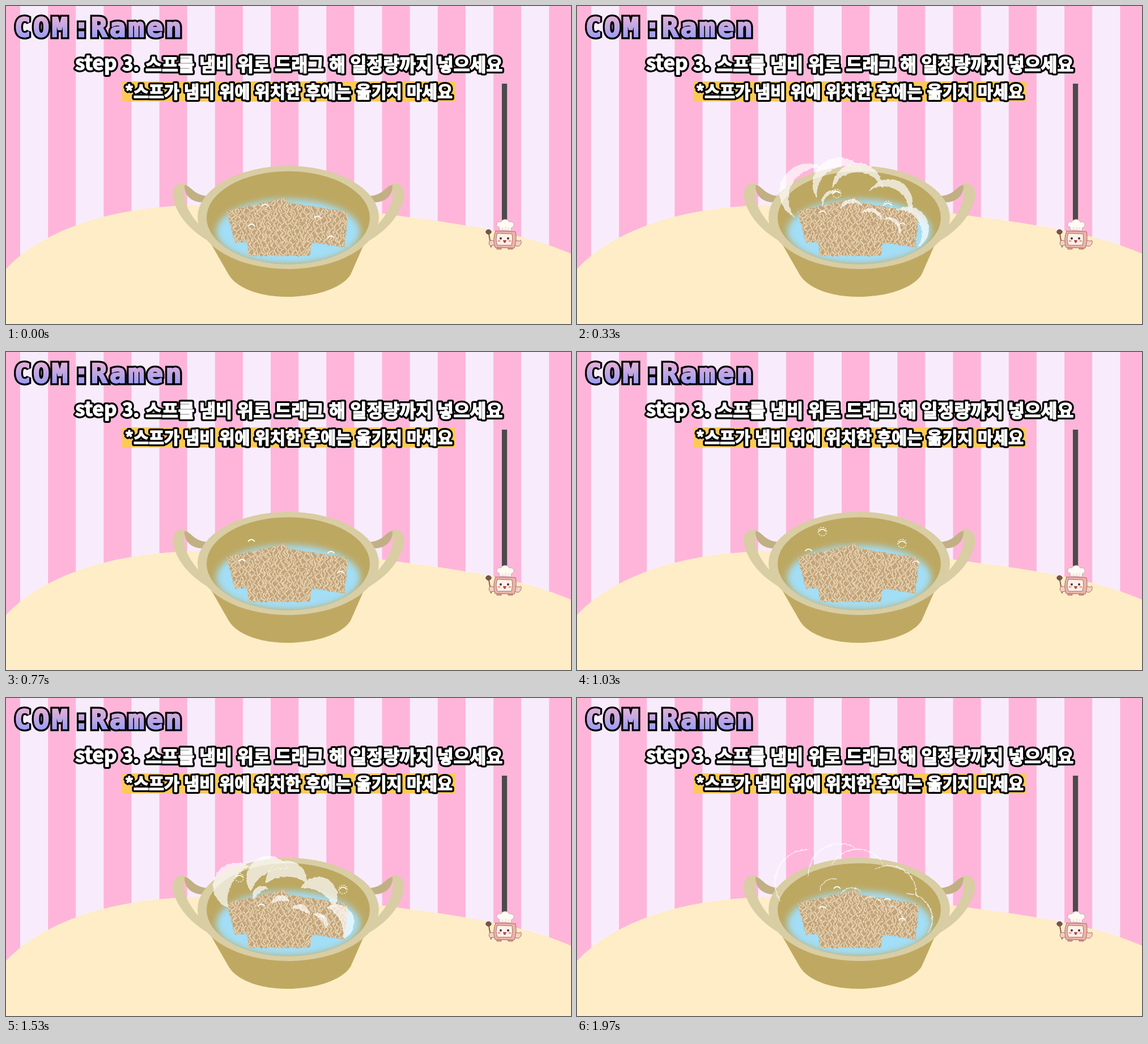
Write an HTML page that moves like this. It is 997x561 px and loops after 2.01 s.

```html
<!DOCTYPE html>
<html lang="ko">
<head>
<meta charset="utf-8">
<title>COM : Ramen</title>
<style>
  html, body { margin: 0; width: 100%; height: 100%; overflow: hidden; background: #f8ecfc; }
  svg { display: block; width: 100vw; height: 100vh; }
  text { white-space: pre; }
  .caption { font-family: "Noto Sans CJK KR", "Noto Sans CJK", sans-serif; font-weight: 900; }
  .outline { stroke: #000; stroke-width: 8; stroke-linejoin: round; }
  .face { fill: #fff; stroke: #fff; stroke-width: 1.5; stroke-linejoin: round; }
  .title { font-family: "DejaVu Sans Mono", monospace; font-weight: 700; letter-spacing: 4.6px; }
  .title .outline { stroke-width: 9; stroke-linejoin: miter; stroke-miterlimit: 2; }
  .title .face { fill: url(#lilac); stroke: url(#lilac); stroke-width: 2.4; stroke-linejoin: miter; stroke-miterlimit: 2; }
</style>
</head>
<body>
<svg viewBox="0 0 997 561" preserveAspectRatio="none">
  <defs>
    <linearGradient id="lilac" gradientUnits="userSpaceOnUse" x1="0" y1="18" x2="0" y2="56">
      <stop offset="0" stop-color="#e6b0d6"/><stop offset="1" stop-color="#9b9df2"/>
    </linearGradient>
    <clipPath id="bowl"><ellipse cx="498" cy="373.5" rx="144" ry="82"/></clipPath>
    <clipPath id="backCut"><path d="M389 362L478 342 490 337 498 347 600 363 603 374 597 426 541 417 404 417 396 387Z"/></clipPath>
    <clipPath id="frontCut"><path d="M424 386L440 379 536 381 540 416 535 441 428 441Z"/></clipPath>
    <filter id="soft" x="-20%" y="-30%" width="140%" height="160%"><feGaussianBlur stdDeviation="6"/></filter>
    <filter id="rough" filterUnits="userSpaceOnUse" x="320" y="230" width="340" height="240">
      <feTurbulence type="fractalNoise" baseFrequency=".18" numOctaves="2" seed="4"/>
      <feDisplacementMap in="SourceGraphic" scale="4" xChannelSelector="R" yChannelSelector="G"/>
    </filter>
    <g id="handle">
      <path fill="#d9cda3" d="M318 314C302 309 291 322 295 340C303 375 335 405 368 420L341 386C322 364 312 345 315 322Z"/>
      <path fill="#c1b083" d="M315 316C325 315 330 333 354 335V346C333 349 314 338 315 316Z"/>
    </g>
  </defs>

  <g id="stripes" fill="#ffb5da"></g>
  <path fill="#feedc6" d="M0 464C45 415 150 352 350 351S660 365 700 371S900 393 997 437V561H0Z"/>

  <use href="#handle"/>
  <use href="#handle" transform="matrix(-1 0 0 1 997 0)"/>
  <path fill="#bfa962" d="M362 420L393 474C408 499 450 513 497 513S592 499 608 474L634 415Z"/>
  <ellipse cx="498" cy="373" rx="160" ry="91" fill="#d9cda3"/>
  <ellipse cx="498" cy="373.5" rx="144" ry="82" fill="#bda862"/>
  <g clip-path="url(#bowl)">
    <ellipse cx="498" cy="398" rx="127" ry="57" fill="#a2def6" filter="url(#soft)"/>
  </g>
  <g fill="none" stroke-linecap="round" filter="url(#rough)">
    <g id="back" clip-path="url(#backCut)"></g>
    <g id="front" clip-path="url(#frontCut)"></g>
  </g>

  <g fill="#fff" stroke="#fff" stroke-width=".8" filter="url(#rough)">
    <path id="steam" fill-opacity=".68" stroke-opacity=".75"/>
  </g>
  <g fill="none" stroke="#fff" stroke-linecap="round">
    <path id="caps" stroke-width="1.7"/>
    <path id="rings" stroke-width="1.1" stroke-dasharray="2 2.6"/>
  </g>

  <rect x="875" y="137" width="9.2" height="243" fill="#4a4a4c"/>
  <g stroke="#a56f66" stroke-linejoin="round" stroke-linecap="round">
    <path fill="none" stroke="#8a6055" stroke-width="2" d="M852 402L856 425"/>
    <ellipse cx="851.5" cy="398.5" rx="4.7" ry="4" fill="#75564f" stroke="#63463f"/>
    <path fill="#f7cfc4" d="M862 415Q856 412 853 415Q851 421 855 423L862 422ZM899 413L906 415Q908 411 909 415Q910 421 904 424L898 423Z"/>
    <path fill="#dd9c93" d="M866 426V429H874V426M886 426V429H894V426"/>
    <path fill="#edb3a8" d="M864 397L899 398Q902 411 897 427L863 426Q858 411 864 397Z"/>
    <path fill="#fff1ea" d="M867 401L893 402Q895 412 892 422L867 422Q863 411 867 401Z"/>
    <path fill="#fffaf4" stroke="#c9a99d" d="M871 396L870 390C863 389 865 379 873 381C876 375 886 375 888 381C897 379 899 389 892 391L891 397Q881 394 871 396Z"/>
    <path fill="none" stroke="#d8c4b8" d="M876 391V394M882 390V393M887 391V394"/>
    <g stroke="none">
      <circle cx="873" cy="410" r="2" fill="#433"/><circle cx="886" cy="410" r="2" fill="#433"/>
      <ellipse cx="870" cy="414.5" rx="2.7" ry="1.7" fill="#f5a19d"/><ellipse cx="889" cy="414.5" rx="2.7" ry="1.7" fill="#f5a19d"/>
      <path d="M877 413H883Q882 418 880 418T877 413Z" fill="#bd4944"/>
    </g>
  </g>

  <rect x="205" y="133" width="588" height="35.5" fill="#fbca55"/>
  <g id="words"></g>
</svg>
<script>
const LOOP = 2010, STEAM_LOOP = 1340;
const $ = id => document.getElementById(id);

function add(parent, tag, attrs, text = '') {
  const node = document.createElementNS('http://www.w3.org/2000/svg', tag);
  for (const key in attrs) node.setAttribute(key, attrs[key]);
  node.textContent = text;
  parent.append(node);
  return node;
}

for (let i = -1; i < 20; i += 2) {
  add($('stripes'), 'rect', { x: 25 + 49.12 * i, y: 0, width: 49.12, height: 561 });
}

// Outlined lettering: a heavy dark copy under the face.
function lettering(style, x, y, size, text) {
  const group = add($('words'), 'g', { class: style, 'font-size': size });
  for (const layer of ['outline', 'face']) add(group, 'text', { x, y, class: layer }, text);
}
lettering('title', 15, 54, 47, 'COM');
lettering('title', 119, 54, 47, ':');
lettering('title', 150, 54, 47, 'Ramen');
lettering('caption', 122, 113, 35, 'step');
lettering('caption', 205, 114, 33, '3.');
lettering('caption', 246, 115, 31.4, '스프를 냄비 위로 드래그 해 일정량까지 넣으세요');
lettering('caption', 210, 161.5, 29.4, '*스프가 냄비 위에 위치한 후에는 옮기지 마세요');

let seed = 17;
const random = () => (seed = seed * 16807 % 2147483647) / 2147483647;

function strands(parent, left, right, top, bottom) {
  add(parent, 'rect', { x: left, y: top, width: right - left, height: bottom - top, fill: '#c5a57c' });
  for (let x = left; x < right; x += 4) {
    const phase = random() * 6.28, swing = 1.8 + random() * 1.6;
    let d = '';
    for (let y = top; y <= bottom; y += 2) {
      const dx = swing * Math.sin(y * .42 + phase) + 1.5 * Math.sin(y * .13 + x);
      d += (d ? 'L' : 'M') + (x + dx).toFixed(1) + ' ' + y;
    }
    add(parent, 'path', { d, stroke: '#b4936b', 'stroke-width': 3.6 });
    add(parent, 'path', { d, stroke: '#e0c9a2', 'stroke-width': 2.5 });
    add(parent, 'path', { d, stroke: '#efe0c2', 'stroke-width': .8 });
  }
}
strands($('back'), 386, 606, 334, 430);
strands($('front'), 420, 544, 376, 444);

function crescent(cx, cy, r, angle, half, thick) {
  const rad = Math.PI / 180, h = half * rad;
  const at = a => (cx + r * Math.cos(a * rad)).toFixed(2) + ' ' + (cy + r * Math.sin(a * rad)).toFixed(2);
  const chord = r * Math.sin(h);
  const rise = Math.max(1, r * (1 - Math.cos(h)) - thick);
  const inner = (chord * chord + rise * rise) / (2 * rise);
  return `M${at(angle - half)}A${r} ${r} 0 ${+(half > 90)} 1 ${at(angle + half)}` +
    `A${inner} ${inner} 0 ${+(rise > chord)} 0 ${at(angle - half)}Z`;
}

// Puffs swell quickly, then thin out to a line; each faces further round the rim.
function steamPath(t) {
  const p = (t % STEAM_LOOP - 70) / 630;
  if (p <= 0 || p >= 1) return '';
  const left = 1 - p;
  const size = 1.17 - .56 * left ** 2.2;
  const thick = 2.4 * left ** 1.6;
  const span = Math.min(1.05, 1.26 - .63 * p);
  const puff = (x, y, r, angle, half, weight) =>
    crescent(x, y - 18 * (size - 1), r * size, angle, half * span, r * weight * thick);
  let d = '';
  for (let i = 0; i < 5; i++) {
    d += puff(407 + 44 * i + 12 * (i % 2), 314 + 10 * (i - 1.2) ** 2, 50 - 3 * i, 208 + 31 * i, 90, .36);
  }
  for (let i = 0; i < 4; i++) {
    d += puff(452 + 33 * i, 345 + 16 * i, 20, 235 + 28 * i, 73, .27);
  }
  return d;
}

// Two bursts of three bubbles; each fans out as it rises, with a partner on the right.
function bubblePaths(t) {
  let caps = '', rings = '';
  for (let i = 0; i < 6; i++) {
    const lane = i % 3;
    const age = t + 586 - 500 * lane - 1727 * Math.floor(i / 3);
    if (age < 0 || age > 1270) continue;
    const x = 433 + 26 * (1 - lane) * Math.sin(age / 510);
    const y = 395 - .07 * age;
    for (const [bx, by] of [[x, y], [1006.5 - x, y + 21]]) {
      caps += `M${bx - 5.5} ${by - 1}A6.5 6.5 0 0 1 ${bx + 5.5} ${by - 1}`;
      if (y < 333) rings += `M${bx - 7.5} ${by}a7.5 7.5 0 1 0 15 0a7.5 7.5 0 1 0 -15 0`;
    }
  }
  return { caps, rings };
}

function render(t) {
  const { caps, rings } = bubblePaths(t);
  $('caps').setAttribute('d', caps);
  $('rings').setAttribute('d', rings);
  $('steam').setAttribute('d', steamPath(t));
}

const start = performance.now();
function tick() {
  render((performance.now() - start) % LOOP);
  requestAnimationFrame(tick);
}
tick();
</script>
</body>
</html>
```
